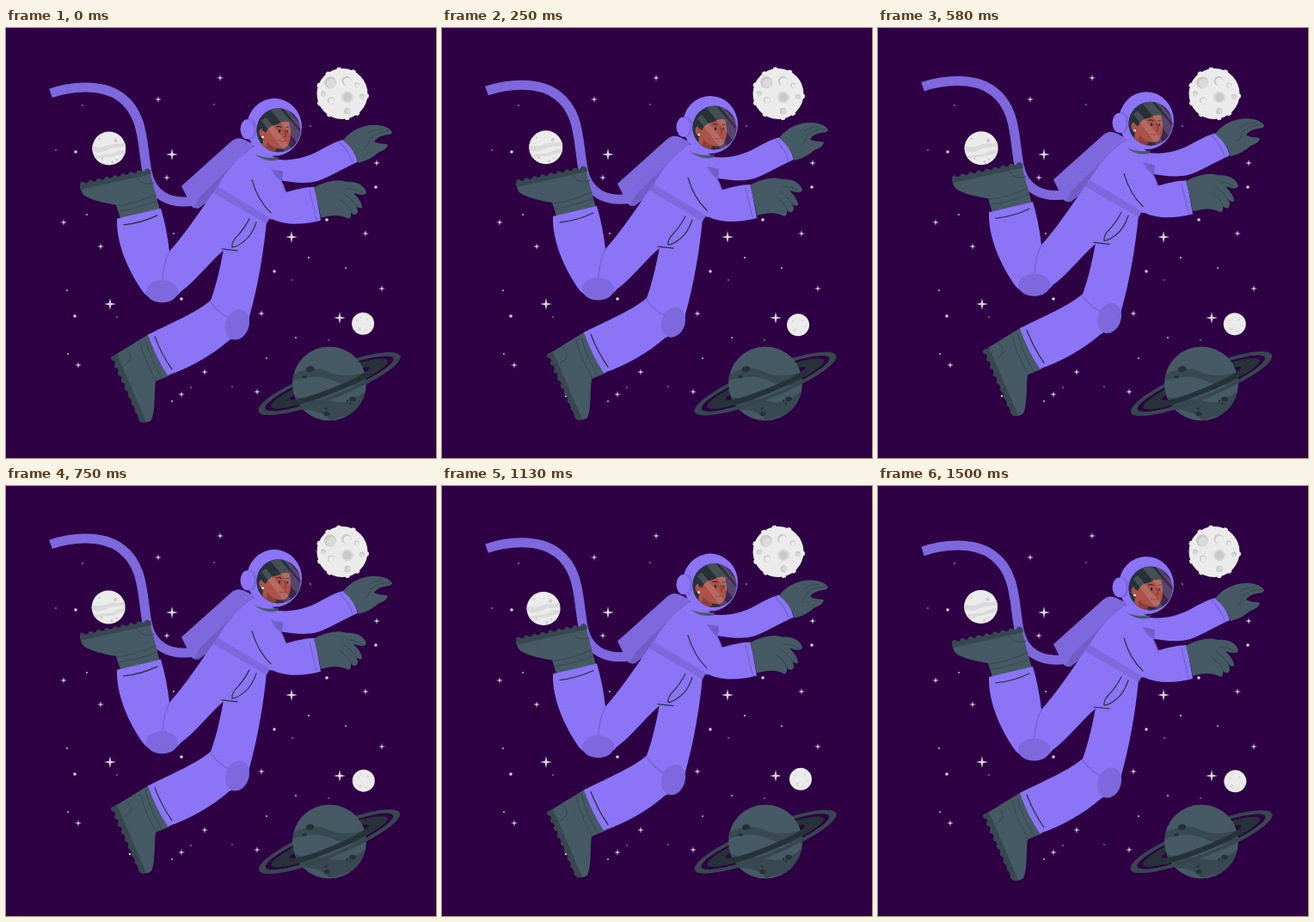
These frames come from a looping animation (500 px wide and 500 px high, 1.54 s). An HTML page:

```html
<!DOCTYPE html>
<html lang="en">
<head>
<meta charset="utf-8">
<title>Floating astronaut</title>
<style>
  html, body { margin: 0; width: 100%; height: 100%; overflow: hidden; background: #2e0044; }
  svg { display: block; width: 100vw; height: 100vh; }
  .suit { fill: #8b74f6; }
  .shade { fill: #7d68dd; }
  .deep { fill: #705ec6; }
  .slate { fill: #455a64; }
  .sole { fill: #37474f; }
  .ink { fill: #263238; }
  .light { fill: #ebebeb; }
  .grey { fill: #dadada; }
  .dim { fill: #c9c9c9; }
  .skin { fill: #ab5249; }
  .line { fill: none; stroke: #263238; stroke-width: 1.2; stroke-linecap: round; }
  .seam { fill: none; stroke: #37474f; stroke-width: 1; stroke-linecap: round; }
  .fold { fill: none; stroke: #7563d0; stroke-width: 1.3; stroke-linecap: round; }
  .tread { fill: none; stroke: #37474f; stroke-width: 6; stroke-linecap: round; stroke-dasharray: 0 9.6; }
</style>
</head>
<body>
<svg viewBox="0 0 500 500">
  <defs>
    <clipPath id="visor"><ellipse cx="317" cy="119" rx="25.5" ry="25.5"/></clipPath>
    <clipPath id="globe"><circle r="43"/></clipPath>
    <clipPath id="disc"><circle r="19.5"/></clipPath>
    <clipPath id="front"><rect x="-95" width="190" height="40"/></clipPath>
    <g id="ring" fill-rule="evenodd">
      <path class="sole" d="M-88.400 0a88.400 18 0 1 0 176.800 0a88.400 18 0 1 0 -176.800 0M-80 0a80 14 0 1 1 160 0a80 14 0 1 1 -160 0"/>
      <path class="ink" d="M-73 0a73 12 0 1 0 146 0a73 12 0 1 0 -146 0M-50 0a50 6 0 1 1 100 0a50 6 0 1 1 -100 0"/>
    </g>
  </defs>

  <path id="stars" fill="#dad1de"/>

  <g id="moon">
    <g id="bumps" class="light"><circle r="29.500"/></g>
    <g class="dim">
      <circle cx="-14" cy="-13" r="7"/><circle cx="5" cy="-15" r="5.500"/>
      <circle cx="-22" cy="0" r="3"/><circle cx="-13" cy="8" r="4"/><circle cx="6" cy="20" r="3.800"/>
      <circle cx="17" cy="-10" r="3"/><circle cx="23" cy="3" r="3"/>
    </g>
    <g class="grey">
      <circle cx="6" cy="4" r="7"/><circle cx="-13" cy="-12" r="5.500"/><circle cx="-22" cy="1" r="2.400"/>
      <circle cx="7" cy="20" r="2.500"/><circle cx="23" cy="4" r="2.300"/>
    </g>
    <g class="light">
      <circle cx="6" cy="-14" r="4.600"/><circle cx="-12.500" cy="8.500" r="3.200"/><circle cx="17.500" cy="-9.500" r="2.300"/>
    </g>
    <circle class="dim" cx="6" cy="4" r="5"/>
  </g>

  <g id="pale">
    <circle class="light" r="19.500"/>
    <g clip-path="url(#disc)">
      <path class="grey" d="M-20-4C-10 2-4-4 4-5S14-4 20-8V-3C12 0 6-2 0 1S-12 7-20 2ZM-17 10C-8 6-2 9 6 5S16 2 20 2V6C12 6 9 9 2 10S-10 10-17 13Z"/>
      <g class="dim"><circle cx="8" cy="-9" r="2"/><circle cx="-11" cy="-11" r="1.300"/><circle cx="-8" cy="12" r="1.300"/><circle cx="4" cy="16" r="1.600"/><circle cx="9" cy="13" r="1.100"/></g>
    </g>
  </g>

  <g id="small">
    <circle class="light" r="13"/>
    <g class="grey"><circle cx="-6" cy="-4" r="1.400"/><circle cx="-3" cy="-7" r="1"/><circle cx="5" cy="-5" r="1.300"/><circle cx="-4" cy="6" r="2"/><circle cx="3" cy="8" r="1.300"/><circle cx="8" cy="2" r="1"/></g>
  </g>

  <g transform="translate(376 413.500)">
    <use class="ringed" href="#ring"/>
    <circle class="slate" r="43"/>
    <g clip-path="url(#globe)">
      <path class="sole" d="M-43-10C-28-18-14-20-2-14S26-8 43-14V0C28 5 14 1 2-4S-24-10-43-3Z" opacity=".85"/>
      <path class="sole" d="M-43 14C-28 20-14 16 2 20S26 20 43 8V30L0 43C-6 32-20 30-43 30Z" opacity=".85"/>
      <g class="ink">
        <ellipse cx="-22.500" cy="-17" rx="5" ry="3.500" transform="rotate(-12 -22 -17)"/>
        <ellipse cx="-29" cy="-8" rx="3" ry="1.800"/><ellipse cx="27" cy="18" rx="4" ry="2.800"/>
        <ellipse cx="-3" cy="35" rx="3.700" ry="2.600"/><circle cx="-4" cy="29" r="1.500"/>
        <circle cx="21" cy="20" r="1.200"/><circle cx="24" cy="23" r="1.200"/>
      </g>
    </g>
    <g class="ringed"><use href="#ring" clip-path="url(#front)"/></g>
  </g>

  <g id="astronaut">
    <path fill="none" stroke="#7d68dd" stroke-width="11" d="M52 76C75 68 112 64 134 81C161 101 158 136 164 167C169 195 191 206 220 201"/>

    <!-- backpack -->
    <path class="shade" d="M204 184L262 132Q269 126 277 130L287 135L292 153L245 195L222 210Q217 210 215 206Z"/>
    <path class="deep" d="M219 209L225 197L281 142L289 150L245 194L224 210Z"/>

    <!-- far arm -->
    <path class="suit" d="M300 149C325 158 344 152 360 145C373 138 383 132 393 130Q405 141 409 156C393 163 377 173 363 178C349 182 334 180 316 177Z"/>
    <path class="fold" d="M388 133Q399 144 403 157"/>
    <path class="slate" d="M392 131C400 120 412 114 426 113C437 112 446 116 449 121C449 125 442 124 436 126Q431 128 428 132C434 136 440 134 444 136C443 141 438 143 433 145C428 149 422 154 410 157Q405 141 392 131Z"/>
    <path class="seam" d="M423 129Q430 121 446 120M421 123Q430 117 438 118M423 131Q422 136 418 139"/>

    <!-- far leg -->
    <path class="slate" d="M124 382L168 355L191 404L174 411C172 425 174 446 169 456Q165 460 157 458Z"/>
    <path class="suit" d="M303 225C300 258 293 301 283 336C281 353 270 359 260 363C239 381 213 396 188 404Q174 383 165 357C194 342 222 331 238 317C245 298 250 275 255 247Z"/>
    <path class="fold" d="M238 319Q247 332 259 337"/>
    <ellipse class="shade" cx="269" cy="345" rx="13.500" ry="18" transform="rotate(18 269 345)"/>
    <path class="line" d="M173 359Q181 380 193 397"/>
    <path class="tread" d="M125 384L158 457"/>
    <path class="sole" d="M124 382L129 379L163 458Q160 460 156 458Z"/>
    <path class="seam" d="M156 366Q162 389 174 409M162 362Q168 386 181 407M140 374C147 381 148 386 138 392"/>

    <!-- near leg -->
    <path class="slate" d="M86 184L167 167L179 212L133 222L128 206C116 204 98 200 91 195Q87 191 86 184Z"/>
    <path class="suit" d="M242 190C225 214 208 240 190 260Q187 233 180 210L129 222C128 250 142 283 160 308C172 321 193 320 203 307C222 293 237 272 254 258L290 250L304 224Z"/>
    <path class="fold" d="M190 260Q183 274 182 293"/>
    <ellipse class="shade" cx="181.500" cy="306.500" rx="18.500" ry="13"/>
    <path class="line" d="M137 229Q157 227 176 218"/>
    <path class="tread" d="M89 182L167 166"/>
    <path class="sole" d="M86 182L168 165L169 170L87 188Z"/>
    <path class="seam" d="M130 207Q152 204 174 194M132 213Q154 210 176 201M152 173C156 182 165 183 172 180"/>

    <!-- torso and near arm -->
    <path class="suit" d="M291 137C270 149 255 168 245 187L304 222L311 223C325 230 347 229 366 224L359 185C349 185 337 188 326 191L320 178L323 163L313 151Z"/>
    <path class="shade" d="M245 184L307 221L303 228L241 192Z"/>
    <path class="deep" d="M308 164L322 167L321 179Q313 174 308 164Z"/>
    <path class="fold" d="M310 166Q321 176 325 191M353 189L361 223"/>
    <path class="line" d="M286 177Q293 201 308 215"/>
    <path class="line" d="M283 222Q276 235 269 242T263 255M291 226Q286 241 277 248T263 255M251 257L269 259"/>
    <path class="slate" d="M358 186C369 179 385 175 396 179C409 178 417 184 419 191C418 196 411 194 404 192C409 197 414 203 414 209Q411 211 407 207Q411 214 407 217Q404 218 401 215Q402 221 398 222C388 216 377 218 366 221Q363 203 358 186Z"/>
    <path class="seam" d="M397 187Q408 187 415 193M393 193Q403 199 408 208M389 200Q398 206 402 215"/>

    <!-- head -->
    <path class="slate" d="M289 147Q302 153 317 150L315 154Q300 156 289 147Z"/>
    <ellipse class="suit" cx="312" cy="115.500" rx="32" ry="33.500"/>
    <ellipse class="shade" cx="284" cy="118" rx="8" ry="12"/>
    <ellipse class="suit" cx="280.500" cy="118" rx="8" ry="11.500"/>
    <g clip-path="url(#visor)">
      <path fill="#3a2850" d="M290 92H344V146H290Z"/>
      <path class="ink" d="M290 92H316Q331 96 332 109L326 113L318 146H290Z"/>
      <path class="skin" d="M302 113Q317 115 321 107L329 109C332 120 332 131 327 138Q322 143 312 139L311 147H297L299 128Q293 126 295 119Q298 115 301 120Z"/>
      <path fill="#8a403b" d="M304 132Q308 138 315 140L311 147H301Z"/>
      <path class="ink" d="M298 119Q298 103 313 97Q329 94 332 110Q323 107 316 112Q306 113 302 122Z"/>
      <path class="line" d="M315 115Q317 114 320 115.500M326 115.500L329 115"/>
      <g class="ink"><ellipse cx="318" cy="120" rx="1.300" ry="1.900"/><ellipse cx="327.500" cy="120" rx="1.100" ry="1.800"/></g>
      <path d="M324 119Q327 125 324 127M317 131Q321 133 325 131" fill="none" stroke="#7f3532" stroke-width="1.200"/>
      <circle cx="298.500" cy="127" r="1.300" fill="#fff"/>
      <path fill="#fff" opacity=".14" d="M308 96L317 92L350 130L342 138ZM322 93L325 92L350 121L348 125ZM297 108L302 104L334 143L326 146Z"/>
    </g>
  </g>
</svg>
<script>
  const PERIOD = 1540;
  const find = id => document.getElementById(id);

  // x, y, radius
  const sparkles = [
    249,58,4, 177,83,4, 193,147,7, 187,174,4, 67,226,4, 110,254,4, 332,243,7, 418,239,4, 431,157,4,
    437,303,4, 121,321,7, 297,332,4, 388,337,7, 84,392,4, 231,400,4, 204,426,4, 292,423,4
  ];
  const dots = [
    89,90,.8, 242,89,.7, 58,142,.8, 81,144,1.8, 354,114,.8, 94,217,.9, 195,239,.9, 71,305,.9, 80,335,1.8,
    129,336,.7, 204,315,1.8, 312,283,1.7, 333,293,.7, 352,267,1, 395,279,.9, 373,223,1.8, 430,185,1.8,
    337,360,.9, 375,363,.7, 303,384,.9, 72,379,.9, 193,434,.9, 215,418,.7, 263,417,.7, 144,428,1.2
  ];

  function trace(list, shape) {
    let d = '';
    for (let i = 0; i < list.length; i += 3) d += shape(list[i], list[i + 1], list[i + 2]);
    return d;
  }

  const sparkle = (x, y, r) => {
    const k = r * .18;
    return `M${x} ${y - r}l${k} ${r - k} ${r - k} ${k} ${k - r} ${k} ${-k} ${r - k} ${-k} ${k - r} ${k - r} ${-k} ${r - k} ${-k}z`;
  };
  const dot = (x, y, r) => `M${x - r} ${y}a${r} ${r} 0 1 0 ${2 * r} 0a${r} ${r} 0 1 0 ${-2 * r} 0`;

  find('stars').setAttribute('d', trace(sparkles, sparkle) + trace(dots, dot));

  for (const angle of [5, 52, 78, 122, 157, 200, 234, 262, 297]) {
    find('bumps').insertAdjacentHTML('beforeend',
      `<rect x="26" y="-2.5" width="5" height="5" rx="1.5" transform="rotate(${angle})"/>`);
  }

  const place = (node, transform) => node.setAttribute('transform', transform);
  const wave = (time, peak) => Math.cos(2 * Math.PI * (time - peak) / PERIOD);

  function draw(now) {
    const time = now % PERIOD;
    const lift = (1 - wave(time, -65)) / 2;
    const drift = wave(time, 320);
    place(find('astronaut'), `translate(0 ${-8.2 * lift})`);
    place(find('pale'), `translate(${119.4 + 1.4 * drift} ${140.6 - 1.9 * drift})`);
    place(find('small'), `translate(${415.5 - 1.5 * drift} ${343.1 + 2.3 * drift})`);
    place(find('moon'), `translate(391 76.5) rotate(${drift})`);
    for (const ring of document.querySelectorAll('.ringed')) place(ring, `rotate(${-21.5 - .8 * lift})`);
  }

  const start = performance.now();
  function tick() {
    draw(performance.now() - start);
    requestAnimationFrame(tick);
  }
  tick();
</script>
</body>
</html>
```
